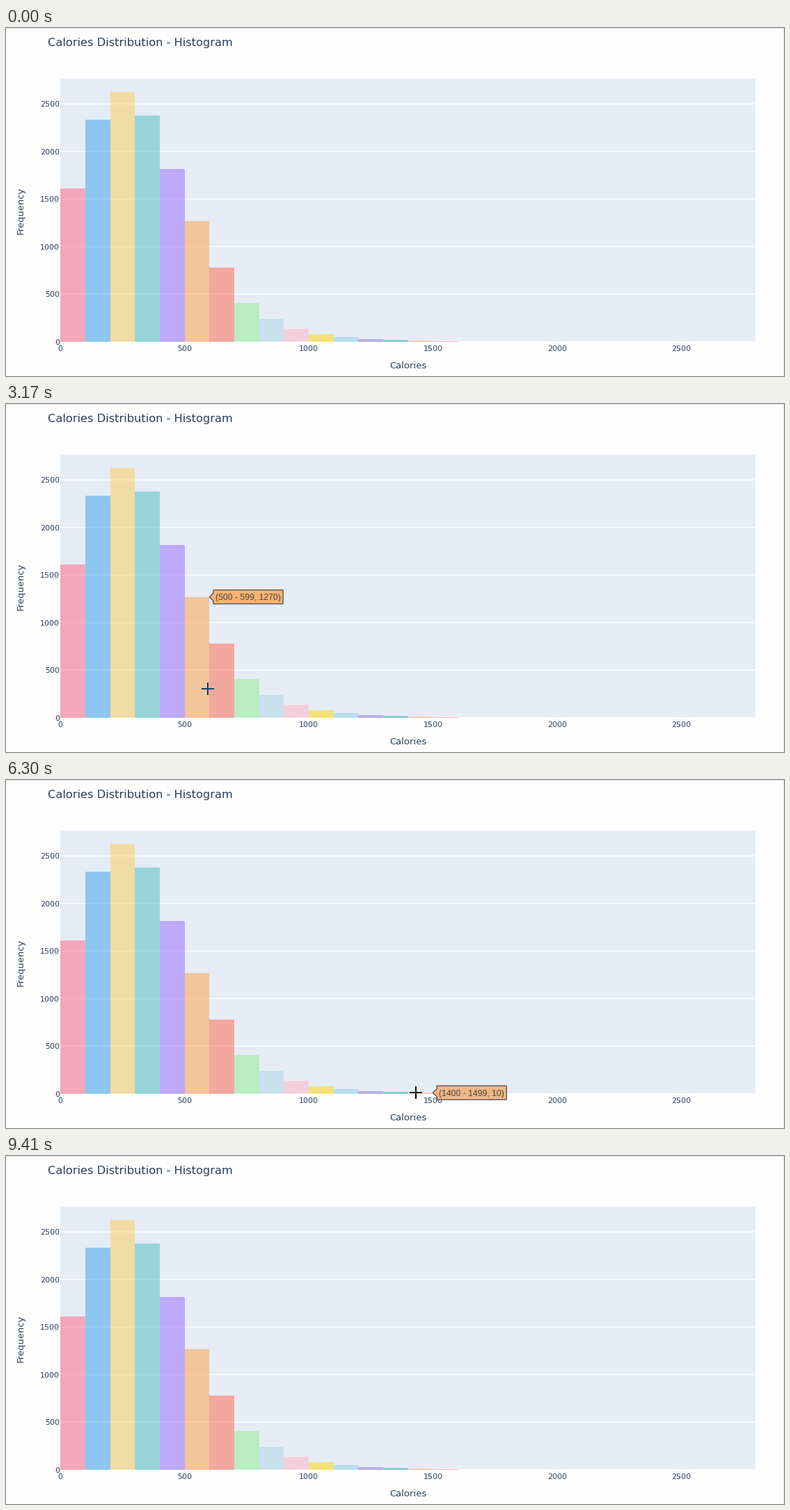
Recreate the animation shown at these times as a matplotlib script. Size 1118x501 px, loop 9820 ms.

```python
import numpy as np
import matplotlib.pyplot as plt
from matplotlib.animation import FuncAnimation
from matplotlib.colors import to_rgb
from matplotlib.patches import Polygon, Rectangle

W, H, DPI = 1118, 501, 64
LOOP, STEP = 9820, 20
LEFT, RIGHT, TOP, BASE = 78.2, 1077.2, 73, 451.6
BIN_W = (RIGHT - LEFT) / 28
PER_COUNT = 0.1369
INK, PLOT_BG = "#2a3f5f", "#e5ecf6"

# measured bins, then a geometric tail
COUNTS = [1610, 2333, 2624, 2375, 1817, 1270, 782, 409, 237]
COUNTS += [round(COUNTS[-1] * 0.586 ** k) for k in range(1, 8)]
COLORS = ("#ff6384 #36a2eb #ffce56 #4bc0c0 #9966ff #ff9f40 tomato lightgreen "
          "lightblue lightpink gold skyblue mediumpurple lightseagreen "
          "sandybrown hotpink").split()

ENTER, ON_AXIS, EXIT, LEAVE = 650, 1140, 8780, 9405
HOVER_LAG, HOVER_END = 110, 7365
# sideways glide of the pointer: time in ms, x
GLIDE = np.array([(1140, 73), (1600, 115), (2630, 200), (3590, 358),
                  (3810, 378), (4140, 378), (5120, 497), (6950, 637),
                  (7360, 637), (7370, 646), (8390, 830)]).T


def px(size):
    return size * 72 / DPI


def mix(color, under, alpha):
    return alpha * np.array(to_rgb(color)) + (1 - alpha) * np.array(to_rgb(under))


def count_y(count):
    return BASE - count * PER_COUNT


def hill_y(x):
    """Height of the pointer's path: one lopsided bump, then a slight rise."""
    width = 78 if x < 155 else 150
    bump = 89 * np.exp(-((x - 155) / width) ** 2)
    return 449.5 - bump - 0.02 * max(0, x - 646)


def pointer(t):
    if t < ON_AXIS:
        u = np.clip((t - ENTER) / (ON_AXIS - ENTER), 0, 1)
        return np.array([76 - 3 * u, 500 - 78 * u])
    if t < EXIT:
        x = np.interp(t, *GLIDE)
        return np.array([x, hill_y(x)])
    u = (t - EXIT) / (LEAVE - EXIT)
    return np.array([830 + 218 * u, 446 + 58 * u ** 1.5])


fig = plt.figure(figsize=(W / DPI, H / DPI), dpi=DPI, facecolor="#fefefe")
ax = fig.add_axes([0, 0, 1, 1])
ax.set(xlim=(0, W), ylim=(H, 0))
ax.axis("off")


def box(x, y, w, h, color, z, **kw):
    return ax.add_patch(Rectangle((x, y), w, h, fc=color, lw=0, zorder=z, **kw))


def shape(z, **kw):
    return ax.add_patch(Polygon(np.eye(3, 2), closed=True, zorder=z,
                                visible=False, joinstyle="miter", **kw))


def label(x, y, s, size, ha="center", font="DejaVu Sans", color=INK, z=4, **kw):
    return ax.text(x, y, s, fontsize=px(size), ha=ha, va="baseline",
                   family=font, color=color, zorder=z, **kw)


def bar(i, color, z, **kw):
    n = COUNTS[i]
    return box(LEFT + i * BIN_W, count_y(n), BIN_W, n * PER_COUNT, color, z, **kw)


# static chart
box(0, 0, W, 1, "#e4e4e4", 0)
box(W - 1, 0, 1, H, "#e9e9e9", 0)
box(LEFT, TOP, RIGHT - LEFT, BASE - TOP, PLOT_BG, 1)
for v in range(0, 2501, 500):
    y = count_y(v)
    box(LEFT, y - 0.7, RIGHT - LEFT, 1.4, "white", 2, snap=False)
    label(77.3, y + 3.9, str(v), 11.1, ha="right")
    label(LEFT + v / 100 * BIN_W, 464.9, str(v), 11.1)
for i, c in enumerate(COLORS):
    bar(i, c, 3, alpha=0.5)
label(60, 25.6, "Calories Distribution - Histogram", 16.2, ha="left")
label(577.5, 489.8, "Calories", 13.1)
label(25.2, 262.5, "Frequency", 13.1, rotation=90, rotation_mode="anchor")

# hover label
tip = shape(6, ec="#444444", lw=px(1.2))
tip_text = label(0, 0, "", 12.3, ha="left", font="Liberation Sans",
                 color="#444444", z=7)

# pointers; the crosshair inverts whatever lies beneath it
cross = shape(8, fc="black", lw=0)
inverse = [box(LEFT, TOP, RIGHT - LEFT, BASE - TOP, 1 - mix(PLOT_BG, "k", 1), 9)]
inverse += [bar(i, 1 - mix(c, PLOT_BG, 0.5), 10) for i, c in enumerate(COLORS)]
for p in inverse:
    p.set_clip_path(cross)
outline = shape(8, fc="white", ec="#222222", lw=px(1))

quarter = np.array([(-1, -9), (1, -9), (1, -1)])
turn = np.array([(0, 1), (-1, 0)])
PLUS = np.vstack([quarter @ np.linalg.matrix_power(turn, k) for k in range(4)])
half = np.array([(0, -11), (4.5, -6), (1.8, -6), (1.8, 6), (4.5, 6)])
RESIZE_Y = np.vstack([half, -half])
RESIZE_X = RESIZE_Y[:, ::-1]
ARROW = np.array([(0, 0), (0, 16), (3.7, 12.5), (6.3, 18.3), (8.6, 17.3),
                  (6.2, 11.6), (11, 11.6)])


def draw_hover(t):
    i = int((pointer(t - HOVER_LAG)[0] - LEFT) // BIN_W)
    shown = t < HOVER_END and 0 <= i < len(COUNTS)
    tip.set_visible(shown)
    tip_text.set_visible(shown)
    if not shown:
        return
    x, y = LEFT + (i + 1) * BIN_W, count_y(COUNTS[i])
    tip_text.set_text(f"({i * 100} - {i * 100 + 99}, {COUNTS[i]})")
    tip_text.set_position((x + 9, y + 4.4))
    x0, x1 = x + 5.7, x + 12 + tip_text.get_window_extent().width
    tip.set_xy([(x, y), (x0, y - 5.5), (x0, y - 10), (x1, y - 10),
                (x1, y + 10), (x0, y + 10), (x0, y + 5.5)])
    tip.set_facecolor(mix(COLORS[i], PLOT_BG, 0.75))


def draw_pointer(t):
    pos = np.round(pointer(t))
    x, y = pos
    shown = ENTER <= t < LEAVE
    in_plot = x >= LEFT and y <= BASE
    for p in [cross, *inverse]:
        p.set_visible(shown and in_plot)
    outline.set_visible(shown and not in_plot)
    if in_plot:
        cross.set_xy(PLUS + pos + 1)
    elif y <= BASE:
        outline.set_xy(RESIZE_Y + pos)
    elif x >= LEFT and y < 478:
        outline.set_xy(RESIZE_X + pos)
    else:
        outline.set_xy(ARROW + pos)


def draw(k):
    t = k * STEP + STEP / 2
    draw_hover(t)
    draw_pointer(t)
    return []


anim = FuncAnimation(fig, draw, frames=LOOP // STEP, interval=STEP,
                     repeat=True, repeat_delay=0, blit=False)
plt.show()
```
